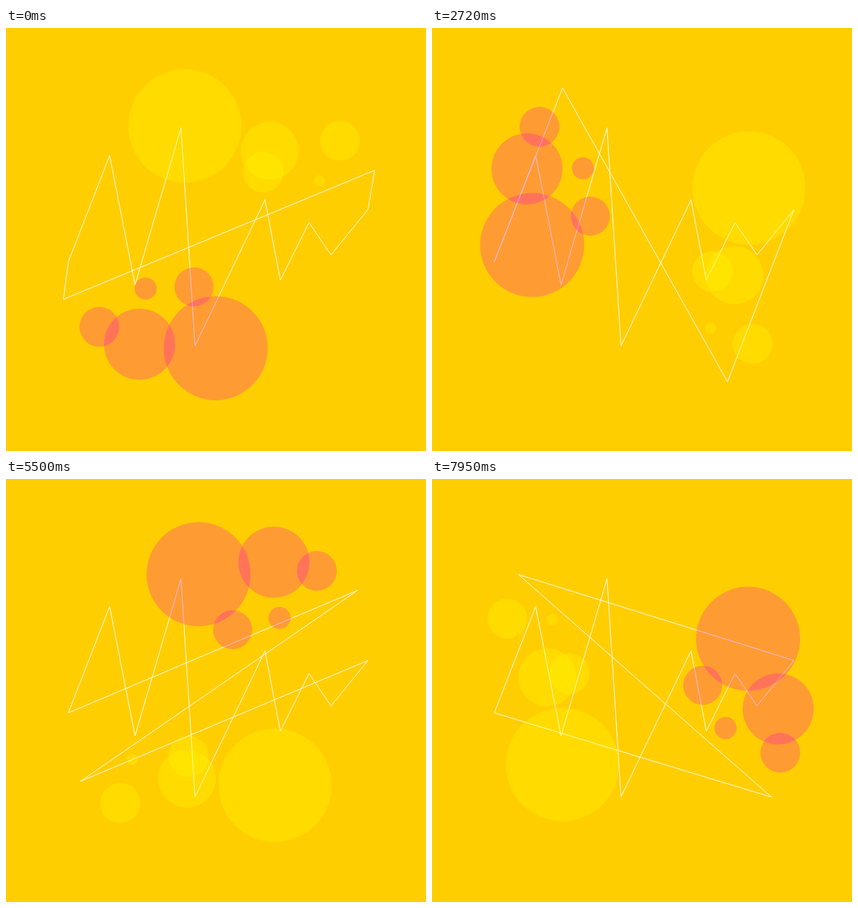
Animation of 630x634 px, one loop 8000 ms. Source, as an HTML page:

```html
<!DOCTYPE html>
<html>
<head>
<meta charset="utf-8">
<style>
  html, body { margin: 0; height: 100%; overflow: hidden; background: #ffce00; }
  svg { display: block; }
  path { fill: none; stroke: #fff; }
  .sun { fill: rgba(255, 255, 0, .25); }
  .rose { fill: rgba(255, 0, 204, .25); }
</style>
</head>
<body>
<svg width="630" height="634" viewBox="0 0 630 634">
  <path id="line"/>
  <g id="wheel">
    <g class="sun">
      <circle cx="268.3" cy="146.8" r="85"/>
      <circle cx="395.6" cy="184" r="43.4"/>
      <circle cx="386" cy="216" r="30.5"/>
      <circle cx="501" cy="169" r="30"/>
      <circle cx="470" cy="229" r="8.3"/>
    </g>
    <g class="rose">
      <circle cx="314.6" cy="479.9" r="78"/>
      <circle cx="200.3" cy="474" r="53.3"/>
      <circle cx="140" cy="447.9" r="29.8"/>
      <circle cx="282" cy="388" r="29.2"/>
      <circle cx="209.4" cy="390.6" r="16.6"/>
    </g>
  </g>
</svg>
<script>
const LOOP = 8000, TICK = 87.2, LEAD = 26;
const CX = 319.5, CY = 310, REACH = 252.6, START_ANGLE = 157.5;
const zigzag = '93.5 350.5 155.5 191 193.5 385 262.5 149.5 283.5 476.5 388.5 257.5 411.5 378 454.5 291.5 487.5 340 543 272';
const line = document.getElementById('line');
const wheel = document.getElementById('wheel');

// Steady rotation in ticks, with a slight sway in speed.
const turnAt = tick => 2.6735 * tick + 0.55 * Math.sin(tick / 12);

function draw(time) {
  const turn = turnAt(Math.floor((time % LOOP + LEAD) / TICK));
  const angle = (START_ANGLE + turn) * Math.PI / 180;
  const dx = REACH * Math.cos(angle), dy = REACH * Math.sin(angle);
  line.setAttribute('d', `M${CX + dx} ${CY + dy} L${zigzag} ${CX - dx} ${CY - dy}Z`);
  wheel.setAttribute('transform', `rotate(${turn} ${CX} ${CY})`);
}

const origin = performance.now();
function frame() {
  draw(performance.now() - origin);
  requestAnimationFrame(frame);
}
frame();
</script>
</body>
</html>
```
